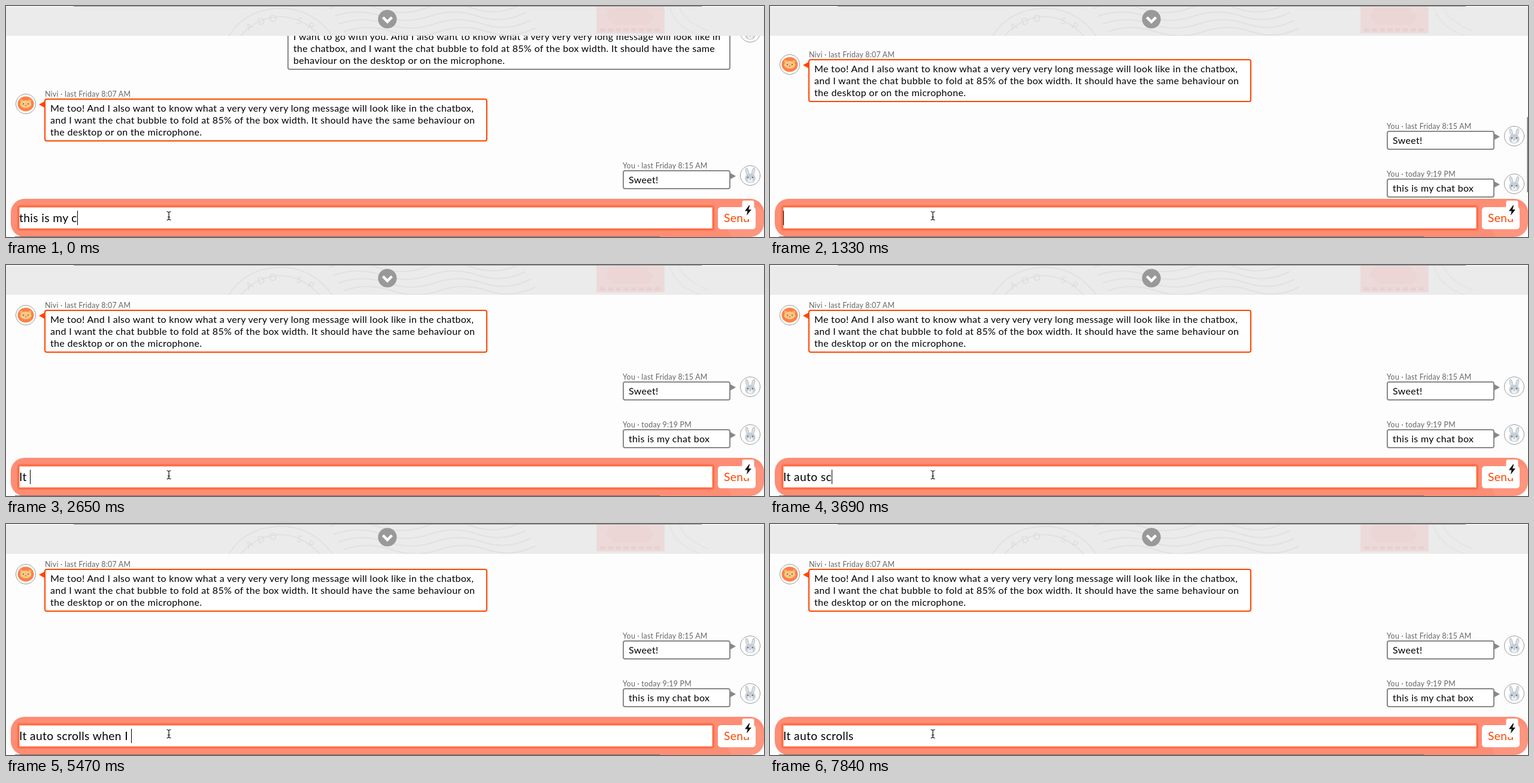
An HTML page that plays this animation: 1266 by 387 pixels, repeating every 7.99 s.

```html
<!DOCTYPE html>
<html lang="en">
<head>
<meta charset="utf-8">
<title>Chat box</title>
<style>
  html, body { margin: 0; width: 100%; height: 100%; overflow: hidden; background: #fdfdfd; }
  svg { display: block; width: 1266px; height: 387px; }
  text { font: 16px Lato, "Open Sans", sans-serif; letter-spacing: .02em; white-space: pre; }
  .meta { font-size: 12.4px; fill: #666; }
  .big { font-size: 19.2px; }
</style>
</head>
<body>
<svg viewBox="0 0 1266 387" xmlns="http://www.w3.org/2000/svg">
  <defs>
    <clipPath id="bar"><rect width="1266" height="50"/></clipPath>
    <filter id="glow" x="-5%" y="-50%" width="110%" height="200%"><feGaussianBlur stdDeviation="1.5"/></filter>
    <g id="lion">
      <circle r="16.5" fill="#fff" stroke="#999"/>
      <ellipse rx="13.5" ry="12.5" fill="#fb8046"/>
      <circle cx="-7" cy="-5" r="2.4" fill="#f9b66c"/>
      <circle cx="7" cy="-5" r="2.4" fill="#f9b66c"/>
      <ellipse cy=".5" rx="9.5" ry="6.5" fill="#f9c785"/>
      <circle cx="-4" r="1" fill="#6b4a3a"/>
      <circle cx="4" r="1" fill="#6b4a3a"/>
      <path d="M-1.5 2h3l-1.5 1.8z" fill="#a4623f"/>
    </g>
    <g id="rabbit">
      <circle r="16.5" fill="#fff" stroke="#999"/>
      <g fill="#c5ced6">
        <ellipse cx="-5" cy="-6.5" rx="2.9" ry="7" transform="rotate(-14 -5 -6)"/>
        <ellipse cx="5" cy="-6.5" rx="2.9" ry="7" transform="rotate(14 5 -6)"/>
        <ellipse cy="4.5" rx="8.8" ry="8"/>
      </g>
      <ellipse cx="-5.2" cy="-6.5" rx="1.2" ry="4.5" fill="#e3e1e6" transform="rotate(-14 -5 -6)"/>
      <ellipse cx="5.2" cy="-6.5" rx="1.2" ry="4.5" fill="#e3e1e6" transform="rotate(14 5 -6)"/>
      <ellipse cy="8" rx="4.5" ry="3.4" fill="#eef0f2"/>
      <circle cx="-4" cy="3" r="1.1" fill="#4d555c"/>
      <circle cx="4" cy="3" r="1.1" fill="#4d555c"/>
      <path d="M-1.5 5.5h3l-1.5 1.8z" fill="#8a8085"/>
    </g>
  </defs>

  <g id="chat"></g>
  <rect id="thumb" x="1264.5" y="186" width="2" height="126" fill="#777"/>

  <g clip-path="url(#bar)">
    <rect width="1266" height="50" fill="#ebebeb"/>
    <g fill="none" stroke="#e1e1e1" stroke-width="2">
      <path d="M372 50Q400 6 455 4T545 50M392 50Q418 20 455 18T524 50"/>
      <path id="waves"/>
      <path d="M1108 0q8 34 52 50M1124 0q8 26 50 42" stroke="#e5e5e5"/>
    </g>
    <g fill="#dcdcdc" font-weight="700">
      <text transform="translate(405 42) rotate(-32)">A</text>
      <text transform="translate(422 33) rotate(-18)">D</text>
      <text transform="translate(440 27) rotate(-6)">O</text>
      <text transform="translate(484 29) rotate(18)">S</text>
      <text transform="translate(502 36) rotate(30)">P</text>
    </g>
    <path d="M986 0h114v46h-114z" fill="#ecdada"/>
    <path d="M1008 2h60l14 16l-10 14h-56l-14-14z" fill="#ebd5d5"/>
    <path d="M992 40h102" stroke="#e9d0d0" stroke-width="5" stroke-dasharray="9 4"/>
    <rect width="1266" height="1.5" fill="#fafafa"/>
    <rect x="113" width="1049" height="1" fill="#8f8f8f"/>
  </g>
  <circle cx="637" cy="22" r="15.6" fill="#999"/>
  <path d="M629.5 19l7.5 7.500l7.500-7.500" fill="none" stroke="#fff" stroke-width="4.500"/>

  <rect x="8" y="323" width="1258" height="64" rx="23" fill="#fd8d75"/>
  <rect x="15" y="386" width="1077" height="1" fill="#8a6a62"/>
  <rect x="20" y="335" width="1162" height="40" rx="3" fill="#ff4a14" filter="url(#glow)"/>
  <rect x="22" y="337" width="1158" height="36" rx="1" fill="#fff" stroke="#ff8a68" stroke-width="2" stroke-opacity=".6"/>
  <circle cx="1239" cy="366" r="34" fill="#fff" fill-opacity=".07"/>
  <rect x="1189" y="337" width="63" height="37" rx="5" fill="#fff"/>
  <text class="big" x="1199" y="362" fill="#ff4500">Send</text>
  <rect x="1229.5" y="326" width="20" height="31" rx="3" fill="#fff"/>
  <path d="M1241 334l-7 9.5h4.5l-1.5 7.5l8-10h-4.8l2-7z" fill="#111"/>

  <text id="typed" class="big" x="22" y="362"></text>
  <rect id="caret" y="343" width="1" height="24"/>
  <path d="M268.5 344.5q3.5 0 3.5 2.5q0-2.5 3.5-2.5M268.5 358.5q3.5 0 3.5-2.5q0 2.5 3.5 2.5M272 346.5v10M270 353.5h4" fill="none" stroke="#111" stroke-width="1.2"/>
</svg>
<script>
const LOOP = 7990;
const $ = id => document.getElementById(id);
const chat = $('chat'), typed = $('typed'), caret = $('caret'), thumb = $('thumb');
const wish = 'And I also want to know what a very very very long message will look like in';

// One message; y is the top of its bubble.
function message(mine, y, width, meta, lines) {
  const x = mine ? 1210 - width : 64;
  const color = mine ? '#888' : '#ff4500';
  const arrow = mine ? `M1210 ${y + 5}l9 5l-9 5z` : `M64 ${y + 5}l-9 5l9 5z`;
  const rows = lines.map((s, i) => `<text x="${x + 10}" y="${y + 22 + i * 20}">${s}</text>`).join('');
  return `<g><text class="meta" x="${x + (mine ? 0 : 1)}" y="${y - 3}">${meta}</text>
    <rect x="${x + 1}" y="${y + 1}" width="${width - 2}" height="${10 + lines.length * 20}" rx="3"
      fill="#fff" stroke="${color}" stroke-width="2"/>
    <path d="${arrow}" fill="${color}"/>
    <use href="#${mine ? 'rabbit' : 'lion'}" x="${mine ? 1243 : 33}" y="${y + 9}"/>${rows}</g>`;
}

chat.innerHTML =
  message(true, 35, 740, '', [
    'I want to go with you. ' + wish,
    'the chatbox, and I want the chat bubble to fold at 85% of the box width. It should have the same',
    'behaviour on the desktop or on the microphone.']) +
  message(false, 155, 740, 'Nivi · last Friday 8:07 AM', [
    'Me too! ' + wish + ' the chatbox,',
    'and I want the chat bubble to fold at 85% of the box width. It should have the same behaviour on',
    'the desktop or on the microphone.']) +
  message(true, 275, 180, 'You · last Friday 8:15 AM', ['Sweet!']) +
  message(true, 355, 180, 'You · today 9:19 PM', ['this is my chat box']);
const sent = chat.lastElementChild;

// Cancellation waves of the postmark
let waves = '';
for (let i = 0; i < 4; i++) waves += `M${540 + i * 8} ${4 + i * 13}q40 -14 80 0t80 0t80 0t80 -6`;
$('waves').setAttribute('d', waves);

const first = 'this is my chat box', second = 'It auto scrolls when I ';
// [time, text, number of letters shown]
const keys = [
  [0, first, 12], [150, first, 13], [290, first, 15], [440, first, 16],
  [740, first, 18], [890, first, 19], [1190, first, 0],
  [1920, second, 1], [2070, second, 2], [2210, second, 3], [2360, second, 4],
  [2650, second, 3], [2800, second, 4], [2950, second, 6], [3090, second, 7], [3240, second, 8],
  [3540, second, 9], [3690, second, 10], [3840, second, 11], [3990, second, 12],
  [4280, second, 13], [4430, second, 15], [4580, second, 16], [4730, second, 17],
  [4880, second, 19], [5030, second, 21], [5320, second, 22], [5470, second, 23],
  [6650, second, 22], [6800, second, 20], [6950, second, 19], [7100, second, 18],
  [7250, second, 17], [7400, second, 16], [7540, second, 15]
];

const show = (el, on) => el.setAttribute('visibility', on ? 'visible' : 'hidden');

function draw(t) {
  const [, text, count] = keys.filter(k => k[0] <= t).pop();
  typed.textContent = text.slice(0, count);
  const end = count ? typed.getComputedTextLength() : 0;
  caret.setAttribute('x', Math.round(22 + end));
  show(caret, !(t >= 5910 && t < 6360) && t < 7840);

  const scroll = t < 1330 ? 0 : t < 1480 ? -66 : -80;
  chat.setAttribute('transform', `translate(0 ${scroll})`);
  show(sent, t >= 1330);
  show(thumb, t >= 1330 && t < 1920);
  thumb.setAttribute('opacity', t < 1630 ? 1 : t < 1780 ? .6 : .25);
}

const start = performance.now();
function tick() {
  draw((performance.now() - start) % LOOP);
  requestAnimationFrame(tick);
}
tick();
</script>
</body>
</html>
```
